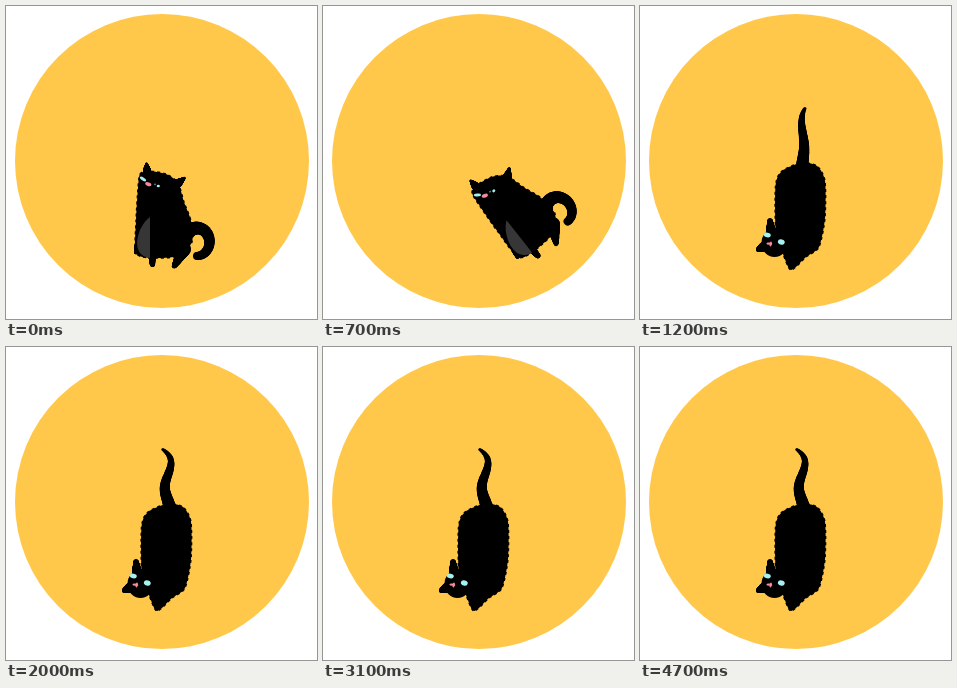
These frames come from a looping animation (311 by 313 pixels, 4.8 s). An HTML page with a canvas:

```html
<!DOCTYPE html>
<html lang="en">
<head>
<meta charset="utf-8">
<title>Cat somersault</title>
<style>
html, body { margin: 0; width: 100%; height: 100%; overflow: hidden; background: #fff; }
canvas { display: block; }
</style>
</head>
<body>
<canvas id="stage" width="311" height="313"></canvas>
<script>
const ctx = document.getElementById('stage').getContext('2d');
const LOOP = 4800, STEP = 100;
const BLACK = '#000', CYAN = '#a4f1f2', PINK = '#f58a9c', GREY = '#363636';
const PIVOT = { x: 168.5, y: 156 };

const mix = (a, b, t) => a + (b - a) * t;

function oval(x, y, rx, ry, color, turn = 0) {
  ctx.fillStyle = color;
  ctx.beginPath();
  ctx.ellipse(x, y, rx, ry, turn, 0, Math.PI * 2);
  ctx.fill();
}

// Smooth closed body through a few key points, with a ragged furry edge
function body(pts) {
  const at = i => pts[(i + pts.length) % pts.length];
  ctx.beginPath();
  ctx.moveTo(...pts[0]);
  pts.forEach((b, i) => {
    const a = at(i - 1), c = at(i + 1), d = at(i + 2);
    ctx.bezierCurveTo(
      b[0] + (c[0] - a[0]) / 8, b[1] + (c[1] - a[1]) / 8,
      c[0] - (d[0] - b[0]) / 8, c[1] - (d[1] - b[1]) / 8, c[0], c[1]);
  });
  ctx.closePath();
  ctx.fillStyle = ctx.strokeStyle = BLACK;
  ctx.fill();
  ctx.lineWidth = 1.4;
  ctx.setLineDash([3, 3]);
  ctx.stroke();
}

// Sweeps a round brush along shape(t) = [x, y, radius]
function sweep(shape) {
  for (let t = 0; t <= 1; t += 0.02) {
    const [x, y, r] = shape(t);
    oval(x, y, r, r, BLACK);
  }
}

function limb(x1, y1, r1, x2, y2, r2) {
  sweep(t => [mix(x1, x2, t), mix(y1, y2, t), mix(r1, r2, t)]);
}

function sitCat() {
  sweep(t => {
    const a = mix(-2.4, 1.65, t);
    return [191 + 12.5 * Math.cos(a), 236 + 14 * Math.sin(a), mix(7, 4, t)];
  });
  body([[134, 168], [142, 165], [160, 168], [172, 177], [178, 196], [185, 215],
    [186, 236], [172, 250], [146, 252], [130, 247], [130, 215], [132, 182]]);
  limb(141, 165, 4, 140.5, 157.5, 1);
  limb(171, 178, 4.5, 178.5, 172, 1.2);
  limb(131, 240, 2.5, 130, 246.5, 2);
  limb(146, 250, 3.5, 146.5, 258.5, 2.5);
  limb(178, 243, 7, 168, 260.5, 2.3);

  ctx.fillStyle = GREY;
  ctx.beginPath();
  ctx.moveTo(144, 211);
  ctx.bezierCurveTo(131, 220, 123, 250, 144, 252);
  ctx.fill();

  oval(137, 173, 3.6, 1.5, CYAN, 0.6);
  oval(142.3, 178.2, 3.2, 1.8, PINK, 0.35);
  oval(149, 178.3, 1.1, 0.9, '#59777a');
  oval(152.3, 180, 1.6, 1.3, CYAN);
}

function walkCat(swing) {
  // The wave grows sharply towards the tip of the tail
  sweep(t => {
    const y = mix(102.5, 160, t);
    const size = 2.6 + 6 * (1 - t) ** 6;
    const x = 162.6 - 1.2 * swing + swing * size * Math.cos((y - 118) * Math.PI / 23);
    return [x, y, 1.6 + 4.6 * t ** 0.7];
  });
  body([[161, 157], [177, 160], [185, 175], [185, 212], [179, 241], [166, 251],
    [151, 264], [143, 248], [136, 230], [135.5, 180], [142, 165]]);
  oval(134.5, 237, 13, 14, BLACK);
  limb(131, 226, 5, 130, 214.5, 2.5);
  limb(125, 240, 5, 118.5, 243.5, 2.5);

  oval(127.3, 229, 3.5, 2.4, CYAN, 0.2);
  oval(141.3, 236, 3.5, 2.6, CYAN, 0.3);
  oval(129.4, 237.7, 3, 1.1, PINK, 0.1);
  oval(130.7, 238, 1.1, 2.5, PINK, 0.2);
}

function spin(degrees) {
  ctx.translate(PIVOT.x, PIVOT.y);
  ctx.rotate(degrees * Math.PI / 180);
  ctx.translate(-PIVOT.x, -PIVOT.y);
}

// Scales vertically with the feet kept on the ground
function squash(amount, ground) {
  ctx.translate(0, ground * (1 - amount));
  ctx.scale(1, amount);
}

// Nine-step wag that holds its last pose for one extra step
function wag(step) {
  const phase = (step + 7) % 9;
  return phase === 8 || phase % 2 ? -0.4 : 1;
}

function draw(step) {
  ctx.fillStyle = '#fff';
  ctx.fillRect(0, 0, 311, 313);
  oval(156, 155, 147, 147, '#ffc84a');
  ctx.save();
  if (step < 10) {
    if (step < 8) spin(step < 7 ? step * 45 : 321.5);
    else squash(step === 8 ? 1 : 0.92, 262);
    sitCat();
  } else if (step < 12) {
    squash(step === 10 ? 0.85 : 0.95, 265);
    walkCat(-0.4);
  } else {
    walkCat(wag(step));
  }
  ctx.restore();
}

const start = performance.now();
function tick() {
  draw(Math.floor((performance.now() - start) % LOOP / STEP));
  requestAnimationFrame(tick);
}
tick();
</script>
</body>
</html>
```
